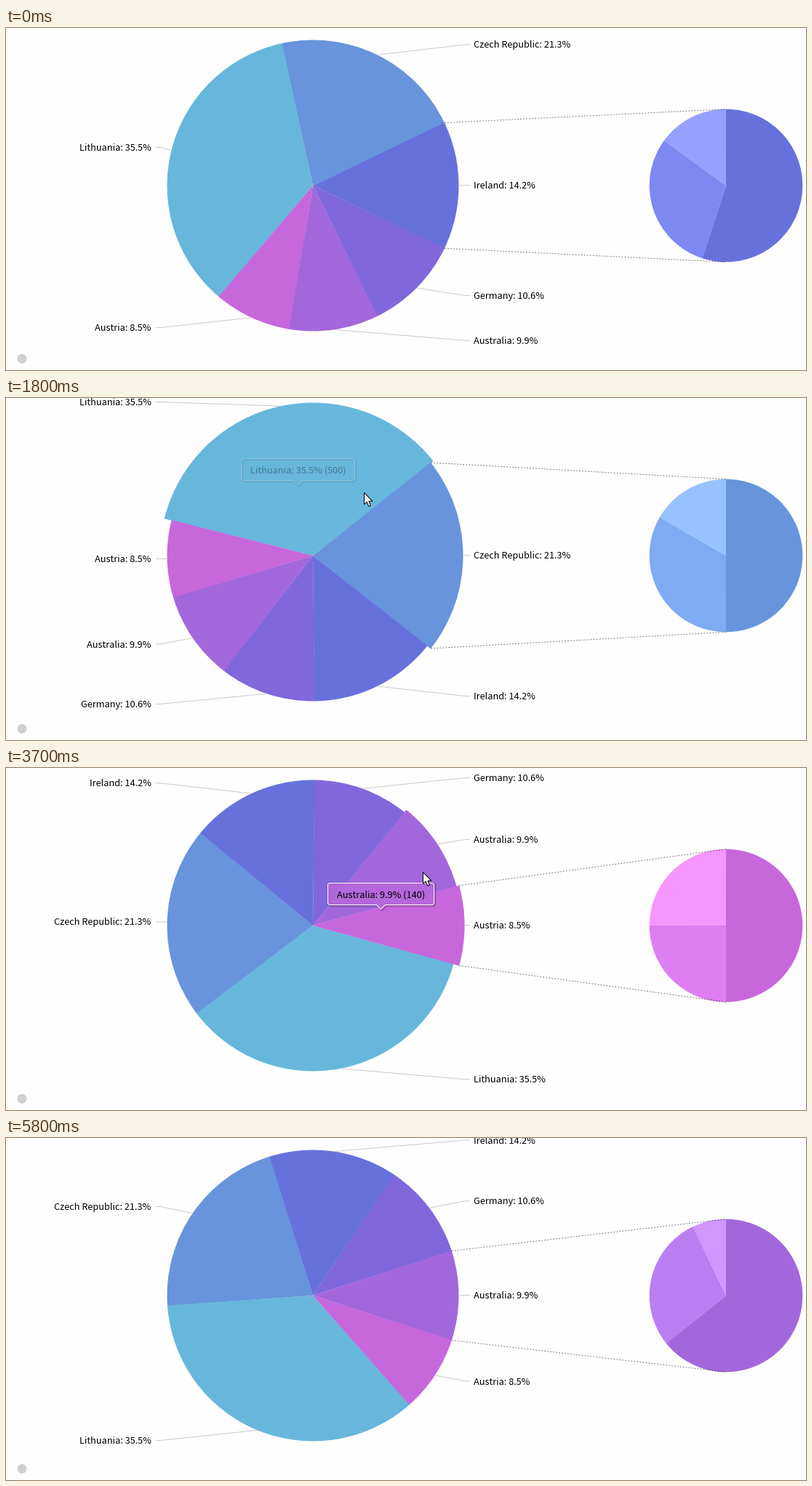
A matplotlib script that plays this animation: 1100 by 471 pixels, repeating every 5900 ms.

```python
import numpy as np
import matplotlib.pyplot as plt
from matplotlib.animation import FuncAnimation
from matplotlib.colors import to_rgb
from matplotlib.patches import Circle, PathPatch, Polygon, Wedge
from matplotlib.path import Path

W, H, DPI = 1100, 471, 64
STEP, FRAMES = 100, 59
PX = 72 / DPI
FONT = dict(family="Noto Sans CJK JP", size=12.75 * PX)
BG = "#fefefe"

MAIN = np.array([422, 217])
MAIN_R, LABEL_R = 200.5, 216
SUB = np.array([990, 217])
SUB_R = 105.3

NAMES = ["Lithuania", "Czech Republic", "Ireland", "Germany", "Australia", "Austria"]
COLORS = ["#67b7dc", "#6794dc", "#6771dc", "#8067dc", "#a367dc", "#c767dc"]
VALUES = np.array([500, 300, 200, 150, 140, 120])
PARTS = [(200, 150, 100, 50), (150, 100, 50), (110, 60, 30),
         (80, 40, 30), (90, 40, 10), (60, 30, 30)]
SPANS = 360 * VALUES / VALUES.sum()
STARTS = np.cumsum(SPANS) - SPANS

# (time, slice) of each selection; the first one holds from the beginning
CLICKS = [(-5000, 2), (734, 1), (1880, 0), (2612, 5), (3900, 4)]
# (pie, slice, enter, leave)
HOVERS = [("main", 2, 270, 330), ("main", 1, 340, 1737), ("main", 0, 1400, 2480),
          ("main", 5, 2500, 3672), ("main", 4, 3633, 4355),
          ("sub", 1, 4385, 4430), ("sub", 0, 4430, 5440)]
# ([(time, pie, slice), ...], hide time)
TOOLTIPS = [([(350, "main", 1)], 715), ([(1750, "main", 0)], 1880),
            ([(2500, "main", 5)], 2612),
            ([(3380, "main", 5), (3633, "main", 4)], 3900),
            ([(4385, "sub", 1), (4430, "sub", 0)], 5440)]
# (time, x, y) of the pointer tip
CURSOR = np.array([(100, 1039, 80), (200, 805, 133), (300, 600, 136), (400, 492, 130),
                   (2420, 492, 130), (2500, 444, 122), (3200, 444, 122),
                   (3400, 556, 205), (3550, 562, 203), (3640, 573, 143),
                   (4200, 573, 143), (4300, 800, 170), (4400, 1021, 198),
                   (5300, 1021, 198), (5400, 1075, 150)])
ARROW = np.array([(0, 0), (0, 16), (3.7, 12.6), (6.3, 18.7), (8.9, 17.6),
                  (6.4, 11.7), (11.4, 11.7)])

fig = plt.figure(figsize=(W / DPI, H / DPI), dpi=DPI, facecolor=BG)
ax = fig.add_axes([0, 0, 1, 1], xlim=(0, W), ylim=(H, 0))
ax.axis("off")


def cubic_out(x):
    return 1 - (1 - np.clip(x, 0, 1)) ** 3


def sin_out(x):
    return np.sin(np.clip(x, 0, 1) * np.pi / 2)


def pulse(t, on, off, length=400):
    return cubic_out((t - on) / length) * (1 - cubic_out((t - off) / length))


def mix(a, b, k):
    return tuple(np.array(to_rgb(a)) * (1 - k) + np.array(to_rgb(b)) * k)


def polar(center, radius, degrees):
    a = np.radians(degrees)
    return center + radius * np.array([np.cos(a), np.sin(a)])


def selection(t):
    return [c for c in CLICKS if c[0] <= t][-1]


def rotation(t):
    """Start angle of the main pie; the selected slice turns to face right."""
    angle = None
    for when, i in CLICKS:
        if when > t:
            break
        goal = -(STARTS[i] + SPANS[i] / 2)
        angle = goal if angle is None else angle + (goal - angle) * sin_out((t - when) / 600)
    return angle


def hover_radius(t, pie, i, radius):
    level = max([pulse(t, on, off) for p, k, on, off in HOVERS if (p, k) == (pie, i)],
                default=0)
    return radius * (1 + 0.05 * level)


def sub_slices(selected):
    """Start angle, span, value and brightened colour of each part."""
    parts = np.array(PARTS[selected])
    spans = 360 * parts / parts.sum()
    starts = -90 + np.cumsum(spans) - spans
    base = np.array(to_rgb(COLORS[selected]))
    tones = [tuple(np.minimum(base + 35 / 255 * 2 * k / len(parts), 1))
             for k in range(len(parts))]
    return list(zip(starts, spans, parts, tones))


def line(points, **style):
    x, y = zip(*points)
    ax.plot(x, y, lw=PX, solid_capstyle="butt", **style)


def draw_main(t):
    turn = rotation(t)
    for i, name in enumerate(NAMES):
        r = hover_radius(t, "main", i, MAIN_R)
        start = turn + STARTS[i]
        ax.add_patch(Wedge(MAIN, r, start - 0.08, start + SPANS[i] + 0.08,
                           fc=COLORS[i], lw=0))
        middle = start + SPANS[i] / 2
        edge = polar(MAIN, r, middle)
        y = polar(MAIN, LABEL_R, middle)[1] - 0.3
        right = np.cos(np.radians(middle)) >= 0
        bend, end, text_x = (632, 638, 643) if right else (212, 206, 199.5)
        line([edge, (bend, y), (end, y)], color="#cbcbcb", zorder=1.5)
        share = 100 * VALUES[i] / VALUES.sum()
        ax.text(text_x, y + 4.6, f"{name}: {share:.1f}%", ha="left" if right else "right",
                va="baseline", color="black", **FONT)


def draw_sub(t):
    when, selected = selection(t)
    alpha = sin_out((t - when) / 960)
    for k, (start, span, _, tone) in enumerate(sub_slices(selected)):
        r = hover_radius(t, "sub", k, SUB_R)
        ax.add_patch(Wedge(SUB, r, start - 0.05, start + span + 0.05,
                           fc=mix(BG, tone, alpha), lw=0))


def draw_links(t):
    selected = selection(t)[1]
    r = hover_radius(t, "main", selected, MAIN_R)
    start = rotation(t) + STARTS[selected]
    for angle, side in ((start, -1), (start + SPANS[selected], 1)):
        line([polar(MAIN, r, angle), SUB + (0, side * SUB_R)], color="black",
             alpha=0.5, ls=(0, (2, 2)), dash_capstyle="butt", zorder=4)


def tooltip_content(when, pie, i):
    """Anchor, colour and text for a slice as it stood when it was entered."""
    if pie == "main":
        anchor = polar(MAIN, MAIN_R / 2, rotation(when) + STARTS[i] + SPANS[i] / 2)
        value, total, name, color = VALUES[i], VALUES.sum(), NAMES[i], COLORS[i]
    else:
        selected = selection(when)[1]
        start, span, value, color = sub_slices(selected)[i]
        anchor = polar(SUB, SUB_R / 2, start + span / 2)
        total, name = sum(PARTS[selected]), "ABCD"[i]
    return anchor, color, f"{name}: {100 * value / total:.1f}% ({value})"


def balloon(x, y, half):
    left, right, top, bottom, c = x - half, x + half, y - 36, y - 6, 3
    verts = [(left + c, top), (right - c, top), (right, top), (right, top + c),
             (right, bottom - c), (right, bottom), (right - c, bottom),
             (x + 6, bottom), (x, y), (x - 6, bottom),
             (left + c, bottom), (left, bottom), (left, bottom - c),
             (left, top + c), (left, top), (left + c, top)]
    corner = [Path.LINETO, Path.CURVE3, Path.CURVE3]
    codes = [Path.MOVETO] + corner * 2 + [Path.LINETO] * 3 + corner * 2
    return Path(verts, codes)


def draw_tooltips(t):
    for stops, hide in TOOLTIPS:
        alpha = pulse(t, stops[0][0], hide)
        if alpha < 0.01:
            continue
        seen = [s for s in stops if s[0] <= t]
        anchor, color, text = tooltip_content(*seen[-1])
        if len(seen) > 1:
            old_anchor, old_color, _ = tooltip_content(*seen[-2])
            k = cubic_out((t - seen[-1][0]) / 400)
            anchor = old_anchor + (anchor - old_anchor) * k
            color = mix(old_color, color, k)
        x, y = np.round(anchor) + 0.5
        label = ax.text(x, y - 16, text, ha="center", va="baseline", color="black",
                        alpha=alpha, zorder=7, **FONT)
        half = round(label.get_window_extent().width / 2 + 12)
        for width in (4, 2):
            ax.add_patch(PathPatch(balloon(x + 1, y + 1, half), fc="none", ec="black",
                                   lw=width * PX, alpha=0.13 * alpha, zorder=5))
        shape = balloon(x, y, half)
        ax.add_patch(PathPatch(shape, fc=color, lw=0, alpha=0.9 * alpha, zorder=6))
        ax.add_patch(PathPatch(shape, fc="none", ec="white", lw=PX, alpha=alpha, zorder=6))


def draw_cursor(t):
    times = CURSOR[:, 0]
    if times[0] <= t <= times[-1]:
        tip = [np.interp(t, times, CURSOR[:, k]) for k in (1, 2)]
        ax.add_patch(Polygon(ARROW + np.round(tip) + 0.5, fc="white", ec="black",
                             lw=PX, joinstyle="miter", zorder=9))


def draw(frame):
    t = frame * STEP
    for artist in [*ax.patches, *ax.lines, *ax.texts]:
        artist.remove()
    line([(0, 470.5), (W, 470.5)], color="#d6d6d6")
    ax.add_patch(Circle((22, 455.5), 6.5, fc="#d0d0d0", lw=0))
    draw_main(t)
    draw_sub(t)
    draw_links(t)
    draw_tooltips(t)
    draw_cursor(t)
    return []


anim = FuncAnimation(fig, draw, frames=FRAMES, interval=STEP, init_func=lambda: [],
                     repeat=True, repeat_delay=0)
plt.show()
```
